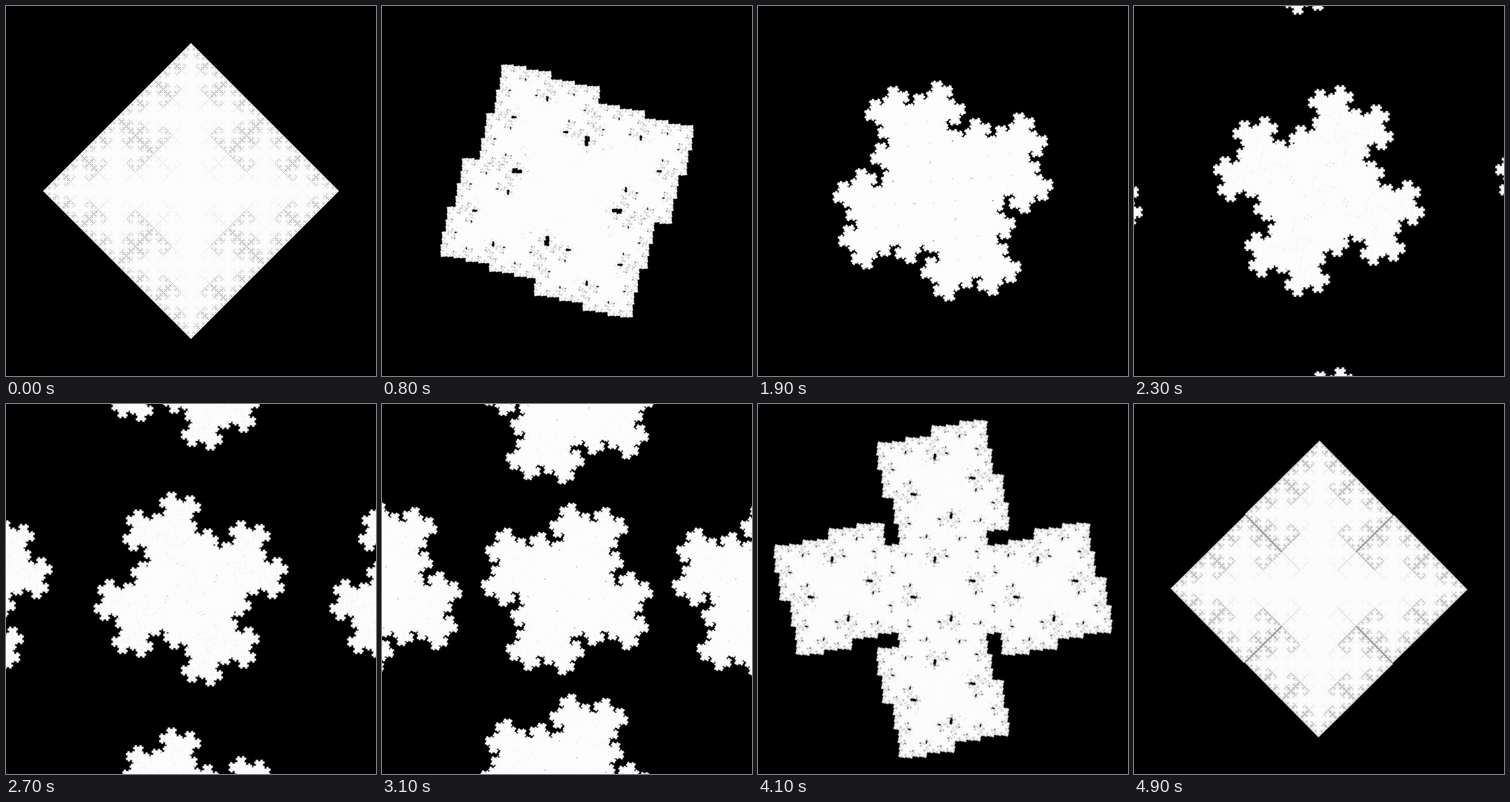
An HTML page with a canvas that plays this animation: 500x500 px, repeating every 5 s.

```html
<!DOCTYPE html>
<html lang="en">
<head>
<meta charset="utf-8">
<title>Five-fold tiles</title>
<style>
  html, body { margin: 0; width: 100%; height: 100%; overflow: hidden; background: #000; }
  canvas { display: block; width: 500px; height: 500px; }
</style>
</head>
<body>
<canvas id="stage" width="500" height="500"></canvas>
<script>
const SIZE = 500, MID = SIZE / 2;
const LOOP = 5000, STEP = 100;
const LEVELS = 7, WHITE = 253;

const ctx = document.getElementById('stage').getContext('2d');
const image = ctx.createImageData(SIZE, SIZE);
const pixels = new Uint32Array(image.data.buffer);
const dark = new Float32Array(SIZE * SIZE);   // share of black left in each pixel

const lerp = (a, b, p) => a + (b - a) * p;

// Every point stays and also sends a copy in four directions.
function spread(points, dist, angle) {
  const dx = dist * Math.cos(angle), dy = -dist * Math.sin(angle);
  const moves = [[0, 0], [dx, dy], [dy, -dx], [-dx, -dy], [-dy, dx]];
  const out = new Float64Array(points.length * 5);
  let n = 0;
  for (let i = 0; i < points.length; i += 2) {
    for (const [mx, my] of moves) {
      out[n++] = points[i] + mx;
      out[n++] = points[i + 1] + my;
    }
  }
  return out;
}

// Blends one small antialiased square per point.
function stamp(points, radius, angle) {
  const c = Math.cos(angle), s = -Math.sin(angle);
  const half = radius / Math.SQRT2;
  const soft = Math.abs(c) + Math.abs(s);
  const top = Math.min(1, 2 * half / soft);
  const reach = (half + soft / 2) * Math.SQRT2;
  const edge = half / soft + 0.5;
  for (let i = 0; i < points.length; i += 2) {
    const px = points[i] - 0.5, py = points[i + 1] - 0.5;
    const x0 = Math.max(0, Math.ceil(px - reach));
    const x1 = Math.min(SIZE - 1, Math.floor(px + reach));
    const y0 = Math.max(0, Math.ceil(py - reach));
    const y1 = Math.min(SIZE - 1, Math.floor(py + reach));
    for (let y = y0; y <= y1; y++) {
      for (let x = x0; x <= x1; x++) {
        const k = y * SIZE + x;
        if (dark[k] < 0.003) continue;
        const dx = x - px, dy = y - py;
        const u = Math.min(top, edge - Math.abs(dx * c + dy * s) / soft);
        if (u <= 0) continue;
        const v = Math.min(top, edge - Math.abs(dy * c - dx * s) / soft);
        if (v > 0) dark[k] *= 1 - u * v;
      }
    }
  }
}

function draw(time) {
  const ease = (1 - Math.cos(Math.PI * time / LOOP)) / 2;
  const turn = ease * Math.PI / 2;
  let angle = 4 * turn + Math.PI / 4 * 0;
  let dist = lerp(100, 50, ease);

  let points = spread([MID, MID], lerp(600, 100, ease), 0);
  for (let i = 0; i < LEVELS; i++) {
    points = spread(points, dist, angle);
    angle += turn;
    dist /= 2;
  }

  dark.fill(1);
  stamp(points, dist * 2, angle + Math.PI / 4);
  for (let i = 0; i < dark.length; i++) {
    const v = Math.round(WHITE * (1 - dark[i]));
    pixels[i] = 0xff000000 | v << 16 | v << 8 | v;
  }
  ctx.putImageData(image, 0, 0);
}

let shown = -1;
function tick() {
  const time = Math.floor(performance.now() % LOOP / STEP) * STEP;
  if (time !== shown) {
    shown = time;
    draw(time);
  }
  requestAnimationFrame(tick);
}
tick();
</script>
</body>
</html>
```
